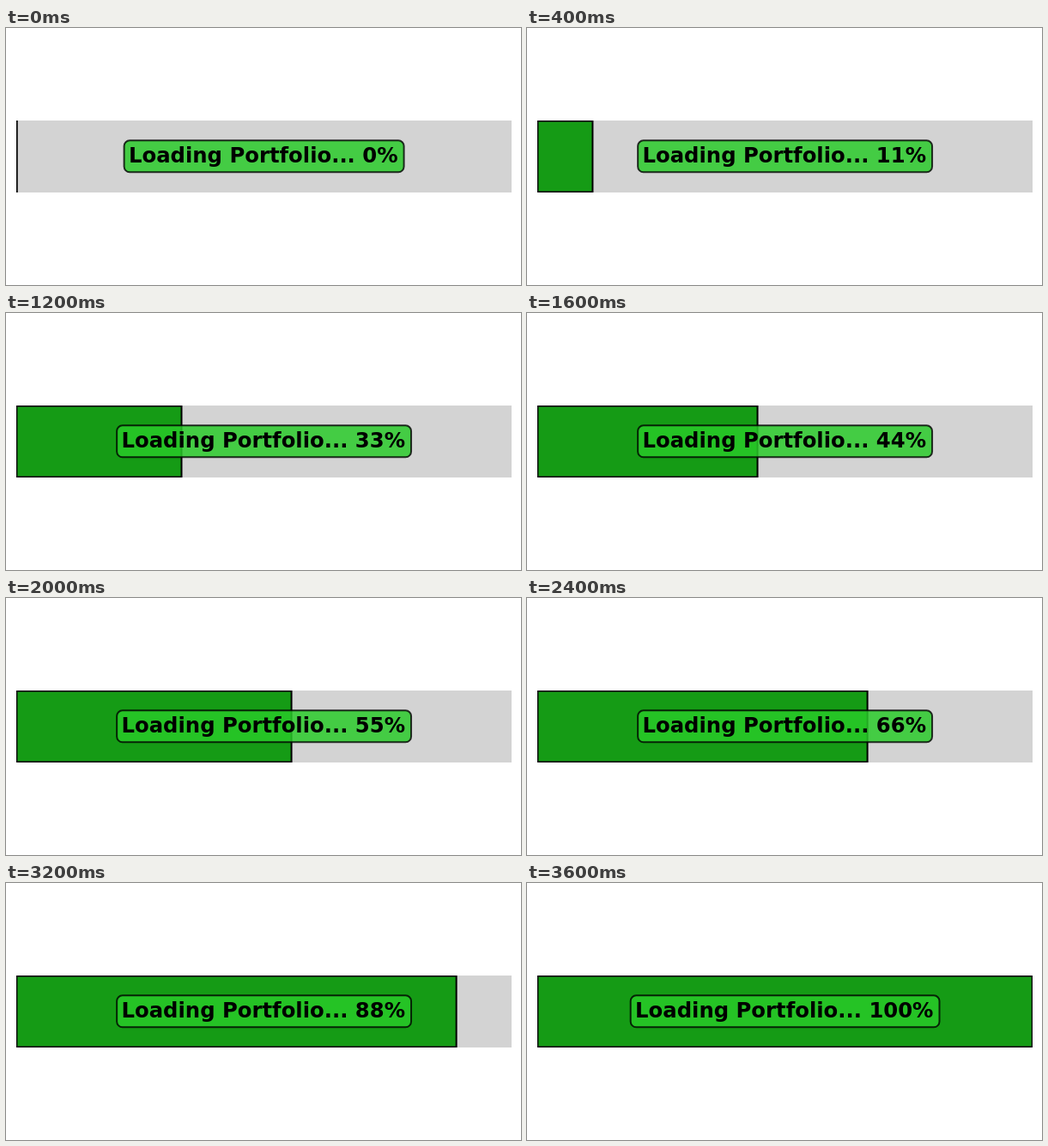
These frames come from a looping animation (600x300 px, 4 s). An HTML page with a canvas:

```html
<!DOCTYPE html>
<html lang="en">
<head>
<meta charset="utf-8">
<title>Loading bar</title>
<style>
  html, body { margin: 0; width: 100%; height: 100%; overflow: hidden; background: #fff; }
  canvas { display: block; }
</style>
</head>
<body>
<canvas id="stage" width="600" height="300"></canvas>
<script>
const ctx = document.getElementById('stage').getContext('2d');
const LOOP = 4000, STEPS = 10;
const track = { x: 12, y: 108, w: 577, h: 84 };
const bar = { x: 12.4, y: 108.5, w: 576.3, h: 83 };
const label = { cx: 300.6, base: 157, top: 131.3, h: 37, pad: 7.4, r: 6.5 };

function drawBar(part) {
  ctx.save();
  ctx.beginPath();
  ctx.rect(track.x, track.y, track.w, track.h);
  ctx.clip();
  ctx.fillStyle = '#d3d3d3';
  ctx.fillRect(track.x, track.y, track.w, track.h);
  ctx.fillStyle = '#159b15';
  ctx.fillRect(bar.x, bar.y, bar.w * part, bar.h);
  ctx.strokeStyle = '#000';
  ctx.lineWidth = 2;
  if (part > 0) {
    ctx.strokeRect(bar.x, bar.y, bar.w * part, bar.h);
  } else {
    ctx.fillStyle = '#000';
    ctx.fillRect(track.x, track.y, 1.7, track.h);
  }
  ctx.restore();
}

function drawLabel(text) {
  ctx.font = 'bold 24.3px "DejaVu Sans", sans-serif';
  ctx.textAlign = 'left';
  ctx.textBaseline = 'alphabetic';
  const m = ctx.measureText(text);
  const ink = m.actualBoundingBoxLeft + m.actualBoundingBoxRight;
  const left = label.cx - ink / 2;

  ctx.beginPath();
  ctx.roundRect(left - label.pad, label.top, ink + 2 * label.pad, label.h, label.r);
  ctx.fillStyle = 'rgba(41, 203, 41, 0.84)';
  ctx.fill();
  ctx.strokeStyle = 'rgba(0, 0, 0, 0.8)';
  ctx.lineWidth = 2;
  ctx.stroke();

  ctx.fillStyle = '#000';
  ctx.fillText(text, left + m.actualBoundingBoxLeft, label.base);
}

function draw(time) {
  const step = Math.floor((time % LOOP) / (LOOP / STEPS));
  const part = step / (STEPS - 1);
  ctx.fillStyle = '#fff';
  ctx.fillRect(0, 0, 600, 300);
  drawBar(part);
  drawLabel(`Loading Portfolio... ${Math.floor(step * 100 / (STEPS - 1))}%`);
}

let start;
function tick(now) {
  start ??= now;
  draw(Math.max(0, now - start));
  requestAnimationFrame(tick);
}
draw(0);
requestAnimationFrame(tick);
</script>
</body>
</html>
```
